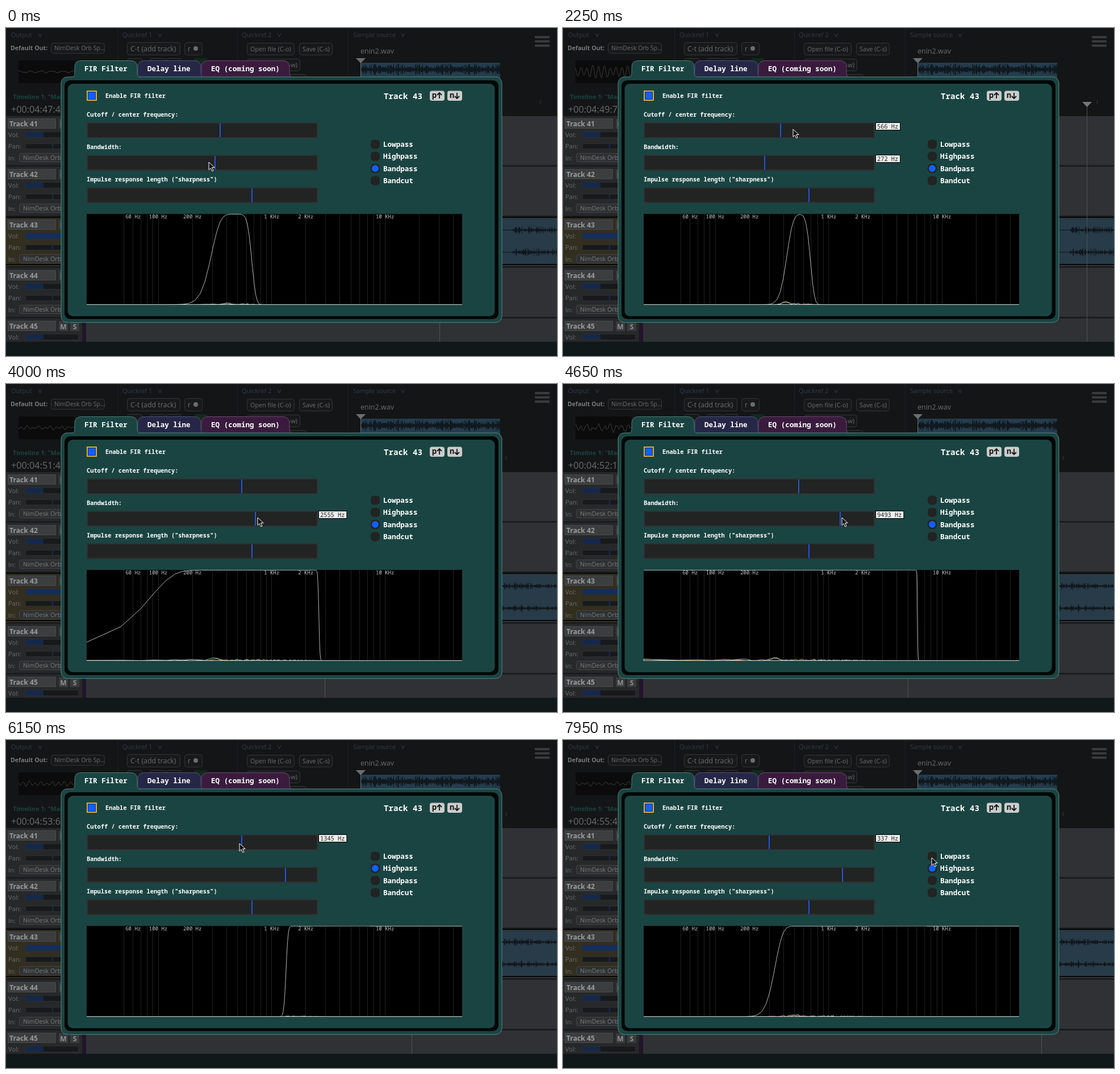
Write an HTML page that moves like this. It is 970 px wide and 577 px high and loops after 8000 ms.

```html
<!DOCTYPE html>
<html lang="en">
<head>
<meta charset="utf-8">
<title>FIR filter</title>
<style>
html, body { margin: 0; width: 100%; height: 100%; overflow: hidden; background: #141516; }
svg { display: block; }
text { font-family: "Open Sans", "Noto Sans", sans-serif; white-space: pre; }
.b { font-weight: 700; }
.m { font-family: "Noto Sans Mono", "DejaVu Sans Mono", monospace; }
</style>
</head>
<body>
<svg id="stage" width="970" height="577" viewBox="0 0 970 577"></svg>
<script>
const LOOP = 8000, STEP = 50;
const TEAL = '#1a4442', BLUE = '#1060ff', DIM = '#6c6d6e';
const BASE = 486.5, HEIGHT = 159;

const rect = (x, y, w, h, fill, more = '') =>
  `<rect x="${x}" y="${y}" width="${w}" height="${h}" fill="${fill}" ${more}/>`;
const text = (x, y, s, size, fill, cls = '', more = '') =>
  `<text x="${x}" y="${y}" font-size="${size}" fill="${fill}" class="${cls}" ${more}>${s}</text>`;
const path = (d, stroke, fill = 'none', more = '') =>
  `<path d="${d}" stroke="${stroke}" fill="${fill}" ${more}/>`;
const vline = (x, y1, y2, color) => path(`M${x} ${y1}V${y2}`, color);
const hash = (a, b = 0) => {
  const v = Math.sin(a * 127.1 + b * 311.7) * 43758.5453;
  return v - Math.floor(v);
};

// Keys are [time, value, value...]; values are blended linearly.
function at(keys, t) {
  const i = keys.findIndex(k => k[0] > t);
  if (i < 0) return keys[keys.length - 1].slice(1);
  const a = keys[i - 1], b = keys[i], u = (t - a[0]) / (b[0] - a[0]);
  return a.slice(1).map((v, n) => v + (b[n + 1] - v) * u);
}

const centerKeys = [[0, 487], [2050, 487], [2250, 566], [2700, 1345], [6150, 1345], [6900, 337]];
const widthKeys = [[0, 385], [300, 385], [900, 470], [1150, 447], [1600, 272], [3250, 272],
  [3500, 1300], [4000, 2555], [4700, 10502]];
const mouseKeys = [[0, 357, 236], [300, 367, 237], [900, 375, 238], [1150, 360, 238],
  [1550, 354, 238], [1950, 376, 182], [2250, 405, 178], [2650, 414, 179], [3150, 400, 236],
  [3500, 422, 235], [4000, 443, 235], [4650, 491, 235], [4900, 525, 232], [5300, 649, 217],
  [5500, 649, 223], [5700, 640, 216], [6100, 414, 182], [6900, 362, 181], [7250, 362, 181],
  [7700, 640, 205], [7950, 649, 207]];
const peakKeys = [[0, 390, 1.5], [1150, 388, 8], [2250, 388, 15], [3000, 388, 5], [4000, 370, 4],
  [5300, 378, 7], [6000, 400, 3], [6950, 421, 11], [7950, 410, 1.5]];
const scopeKeys = [[0, .6], [1150, 4], [2250, 11], [2800, 9], [3400, 2], [4000, 2.5],
  [5300, 8], [6000, 3], [6950, 8], [7500, 3], [7950, 2.5]];

const toLog = keys => keys.map(([t, hz]) => [t, Math.log(hz)]);
const centerLog = toLog(centerKeys), widthLog = toLog(widthKeys);
const sliderX = hz => 373 + Math.log(hz / 447) / .0268;
const plotX = hz => 268 + 199.6 * Math.log10(hz / 100);

function header() {
  let s = rect(0, 0, 970, 155, '#141516');
  for (const x of [196, 407, 602]) s += vline(x + .5, 0, 86, '#19212a');
  for (const [x, label, v] of [[9, 'Output', 60], [205, 'Quickref 1', 271],
    [415, 'Quickref 2', 481], [611, 'Sample source', 699]])
    s += text(x, 16, label, 11, '#303d4e') + path(`M${v - 3} 9.5l3 6l3 -6`, '#303d4e');
  const button = (x, y, w, h, label, size) =>
    rect(x + .5, y + .5, w, h, '#18191a', 'rx="4" stroke="#343536"') + text(x + 6, y + h / 2 + size * .38, label, size, DIM);
  s += text(8, 39, 'Default Out:', 10.6, '#78797a', 'b')
    + button(79, 26, 94, 18, 'NimDesk Orb Sp...', 10.5)
    + button(213, 25, 93, 22, 'C-t (add track)', 12.4)
    + button(314, 25, 31, 22, 'r', 12)
    + `<circle cx="334" cy="36" r="4" fill="${DIM}"/>`
    + button(424, 26, 83, 21, 'Open file (C-o)', 10.8)
    + button(516, 26, 58, 21, 'Save (C-s)', 10.8)
    + button(424, 54, 93, 21, '', 11) + text(513, 69, 'Save as (C-w)', 11, DIM, '', 'text-anchor="end"')
    + button(424, 81, 104, 21, '', 11);
  for (const x of [213, 253, 281]) s += button(x, 53, 27, 22, '', 11);
  s += rect(331, 53, 24, 20, '#12291b', 'rx="4"');
  s += text(624, 44.5, 'enin2.wav', 12.5, DIM);
  for (const y of [14, 21.5, 29]) s += rect(931, y, 26, 4, '#3a3b3c', 'rx="1"');
  s += rect(625, 61, 245, 30, '#243d4d');
  let d = '';
  for (let x = 625.5; x < 870; x++) {
    const h = 2 + 9 * hash(x) * (.35 + .65 * Math.abs(Math.sin(x * .071)));
    d += `M${x} ${73 - h}V${73 + h}`;
  }
  s += path(d, '#10191f') + path('M616 53h17l-8.5 9z', 'none', DIM) + vline(624.5, 60, 86, DIM);
  s += text(12, 125, 'Timeline 1: "Main"', 10.8, '#1b4440', 'b');
  return s + rect(22, 57, 99, 40, '#0b0b0c');
}

function track(n) {
  const y = 155 + (n - 41) * 89, on = n === 43;
  const mid = (dx, s) => text(4, y + dx, s, 11.2, '#6c6d6f');
  let s = rect(0, y, 134, 87, on ? '#322e20' : '#27282a')
    + rect(134, y, 7, 87, '#21152a') + rect(141, y, 829, 87, '#303135')
    + rect(0, y + 86, 970, 3, '#1b1c1f')
    + rect(3.5, y + 4.5, 84, 17, '#3c3d3e', 'stroke="#48494a"')
    + text(6, y + 18, 'Track ' + n, 12.2, '#9a9b9c', 'b');
  for (const [x, c] of [[93, 'M'], [113, 'S']])
    s += rect(x, y + 5, 16, 17, '#3a3b3c') + text(x + 8, y + 18.5, c, 12, '#8e8f90', 'b', 'text-anchor="middle"');
  s += mid(37, 'Vol:') + rect(34.5, y + 27.5, 93, 10, '#18191b', 'stroke="#2b2c2e"')
    + rect(35, y + 28, on ? 92 : 31, 9, on ? '#142e5c' : '#14284a')
    + mid(57, 'Pan:') + rect(34.5, y + 48.5, 93, 9, '#18191b', 'stroke="#2b2c2e"')
    + rect(81, y + 49, 2, 8, '#152c58')
    + mid(78, 'In:') + rect(23.5, y + 65.5, 100, 15, '#2f3032', 'rx="3" stroke="#434445"')
    + text(30, y + 77, 'NimDesk Orb...', 10.7, '#7a7b7c');
  if (on) s += rect(141, y + 2, 829, 82, '#273b48') + rect(0, y - 1, 970, 2, '#08090a') + rect(0, y + 82, 970, 2, '#08090a');
  return s;
}

function regionWave() {
  let d = 'M865 355.5H1470M865 394.5H1470';
  for (let x = 892.5; x < 1470; x++) {
    const swell = x < 960 ? .5 + .3 * Math.sin((x - 890) / 20) : .6 + .25 * Math.sin(x * .06);
    for (const y of [355.5, 394.5]) {
      const h = 1 + 8 * swell * hash(x, y) ** 2;
      d += `M${x} ${y - h}V${y + h}`;
    }
  }
  return path(d, '#10171c');
}

function tab(x, w, fill, edge, label, tx) {
  return path(`M${x - 4} 87Q${x} 85 ${x} 78V69Q${x} 57.5 ${x + 12} 57.5H${x + w - 12}Q${x + w} 57.5 ${x + w} 69V78Q${x + w} 85 ${x + w + 5} 87`, edge, fill)
    + text(tx, 75.5, label, 12.6, '#fff', 'm b');
}

function dialog() {
  let s = tab(344, 155, '#3a1b3e', '#6d4a70', 'EQ (coming soon)', 361)
    + tab(232, 111, '#262747', '#4d5478', 'Delay line', 249)
    + rect(97, 86, 776, 432, TEAL, 'rx="11" stroke="#558682"')
    + tab(121, 110, TEAL, '#4d7d79', 'FIR Filter', 138)
    + rect(118, 86.5, 117, 4, TEAL)
    + rect(103, 92, 764, 420, '#020707', 'rx="10"')
    + rect(108.5, 98, 752, 409, TEAL, 'rx="9"')
    + rect(143, 111, 16, 16, BLUE, 'stroke="#e0ab3c" stroke-width="2"')
    + rect(144.5, 112.5, 13, 13, 'none', 'stroke="#222f3c"')
    + text(175, 122.5, 'Enable FIR filter', 10.4, '#fff', 'm b')
    + text(665, 125, 'Track 43', 14.2, '#fff', 'm b');
  for (const [x, c, way] of [[746, 'p', -1], [777, 'n', 1]])
    s += rect(x, 110.5, 26, 17.5, '#cbcccc', 'rx="4"') + text(x + 4, 123, c, 13.5, '#111', 'm b')
      + path(`M${x + 17} ${119 - 5 * way}V${119 + 4 * way}M${x + 13} ${119 + way}l4 ${4 * way}l4 ${-4 * way}`, '#111', 'none', 'stroke-width="1.8"');
  ['Cutoff / center frequency:', 'Bandwidth:', 'Impulse response length ("sharpness")'].forEach((label, i) => {
    s += text(142, 156 + i * 57, label, 10.35, '#fff', 'm b')
      + rect(143, 167 + i * 57, 405, 26, '#222323', 'stroke="#303232" stroke-width="2"');
  });
  ['Lowpass', 'Highpass', 'Bandpass', 'Bandcut'].forEach((label, i) => {
    const y = 204.5 + i * 21.3;
    s += rect(642, y - 8, 16, 16, '#222323', 'rx="6"') + text(664, y + 4.5, label, 12.6, '#fff', 'm b');
  });
  return s + rect(142, 327, 661, 160, '#000') + grid();
}

function grid() {
  let s = '';
  for (let dec = 10; dec <= 10000; dec *= 10)
    for (let n = 1; n < 10; n++) {
      const hz = dec * n;
      if (hz >= 50 && hz < 47000) s += vline(Math.floor(plotX(hz)) + .5, 327, 486, '#222');
    }
  for (const [hz, label] of [[60, '60 Hz'], [100, '100 Hz'], [200, '200 Hz'],
    [1000, '1 KHz'], [2000, '2 KHz'], [10000, '10 KHz']])
    s += text(plotX(hz), 334.5, label, 9, '#c4c4c4', 'm', 'text-anchor="middle"');
  return s;
}

const stage = document.getElementById('stage');
stage.innerHTML = rect(0, 0, 970, 577, '#10181a') + header()
  + '<g id="under"></g>'
  + `<svg y="155" width="970" height="397" viewBox="0 155 970 397">${[41, 42, 43, 44, 45].map(track).join('')}<g id="wave">${regionWave()}</g></svg>`
  + '<g id="head"></g>' + dialog() + '<g id="live"></g>';
const [under, wave, head, live] = ['under', 'wave', 'head', 'live'].map(id => document.getElementById(id));

// Smooth step of a windowed filter edge, in Hz.
const edge = hz => {
  const z = hz / 46;
  return 1 / (1 + Math.exp(-1.5976 * z - .07056 * z ** 3));
};

function scope(t, frame) {
  const [amp] = at(scopeKeys, t);
  const rough = t > 4300 && t < 6000 ? 3 : 1.3;
  let d = '';
  for (let x = 22; x <= 121; x++) {
    const y = 77 - amp * Math.sin(x * .61 + frame * 1.7) * (.8 + .2 * Math.sin(x * .11 + frame))
      - rough * (Math.sin(x * .33 + frame * 2.3) + 1.2 * (hash(x, frame) - .5));
    d += (d ? 'L' : 'M') + x + ' ' + y.toFixed(1);
  }
  return path(d, '#3a3b3c');
}

function spectrum(gain, t, frame, seed, color, scale) {
  const [px, ph] = at(peakKeys, t);
  let d = 'M142 ' + BASE;
  for (let k = 1; k < 160; k++) {
    const hz = k * 23.44, x = plotX(hz);
    const fade = Math.max(0, 1 - Math.max(0, x - 420) / 150);
    const h = ph * scale * Math.exp(-(((x - px) / 8) ** 2)) + 2.6 * fade * hash(k + seed, frame) ** 3;
    d += `L${x.toFixed(1)} ${(BASE - h * gain(hz)).toFixed(1)}`;
  }
  return path(d, color, 'none', 'stroke-width=".9"');
}

function plot(center, width, high, t, frame) {
  const gain = high ? hz => edge(hz + 6 - center)
    : hz => edge(hz + 6 - center + width / 2) - edge(hz + 12 - center - width / 2);
  let d = '';
  for (let k = 1; k <= 310; k++) {
    const hz = k * 23.44;
    d += `${d ? 'L' : 'M'}${Math.max(142, plotX(hz)).toFixed(1)} ${(BASE - HEIGHT * gain(hz)).toFixed(1)}`;
  }
  return path(d + 'H803', '#b4b4b4')
    + spectrum(gain, t, frame, 7, '#d6b04a', .7) + spectrum(gain, t, frame, 31, '#a9d5d2', 1)
    + path(`M142 ${BASE}H803`, '#d2d2d2');
}

function tip(y, hz) {
  const s = Math.round(hz) + ' Hz';
  return rect(550.5, y + .5, 6.2 * s.length + 6, 13, '#eee', 'stroke="#000"') + text(553, y + 10.5, s, 10.35, '#222', 'm');
}

function draw(t) {
  const frame = Math.round(t / STEP);
  const center = Math.exp(at(centerLog, t)[0]), width = Math.exp(at(widthLog, t)[0]);
  const high = t >= 5500;

  // The timeline jumps back half a page when the playhead leaves the view.
  let x = 763 + .0711 * t;
  const shift = x > 970 ? 486 : 0;
  x = Math.floor(x - shift);
  const clock = (287.46 + t / 1000) % 60;
  const cs = Math.floor(clock * 100 + .01);
  under.innerHTML = scope(t, frame)
    + text(9, 149, `+00:04:${Math.floor(cs / 100)}:${String(cs % 100).padStart(2, '0')}`, 16.2, DIM)
    + vline(shift ? 880.5 : 940.5, 127, 134, '#38393b');
  wave.setAttribute('transform', `translate(${-shift})`);
  head.innerHTML = vline(x + .5, 138, 552, '#515256') + path(`M${x - 8} 130h17l-8.5 9z`, 'none', '#777');

  const marks = [sliderX(center), sliderX(width), 432]
    .map((v, i) => rect(Math.round(v), 168 + i * 57, 2, 24, '#2058d8')).join('');
  const [mx, my] = at(mouseKeys, t).map(Math.round);
  live.innerHTML = marks
    + `<circle cx="650" cy="${high ? 225.8 : 247.1}" r="6" fill="${BLUE}"/>`
    + plot(center, width, high, t, frame)
    + ((t >= 2050 && t < 3700) || t >= 6150 ? tip(166, center) : '')
    + ((t >= 300 && t < 2800) || (t >= 3250 && t < 5900) ? tip(223, width) : '')
    + path(`M${mx} ${my}v13.5l3.2 -3l2.5 5.3l2.4 -1.1l-2.5 -5.2h4.6z`, '#fff', '#111');
}

function tick(now) {
  draw(Math.floor((now % LOOP) / STEP) * STEP);
  requestAnimationFrame(tick);
}
draw(0);
requestAnimationFrame(tick);
</script>
</body>
</html>
```
